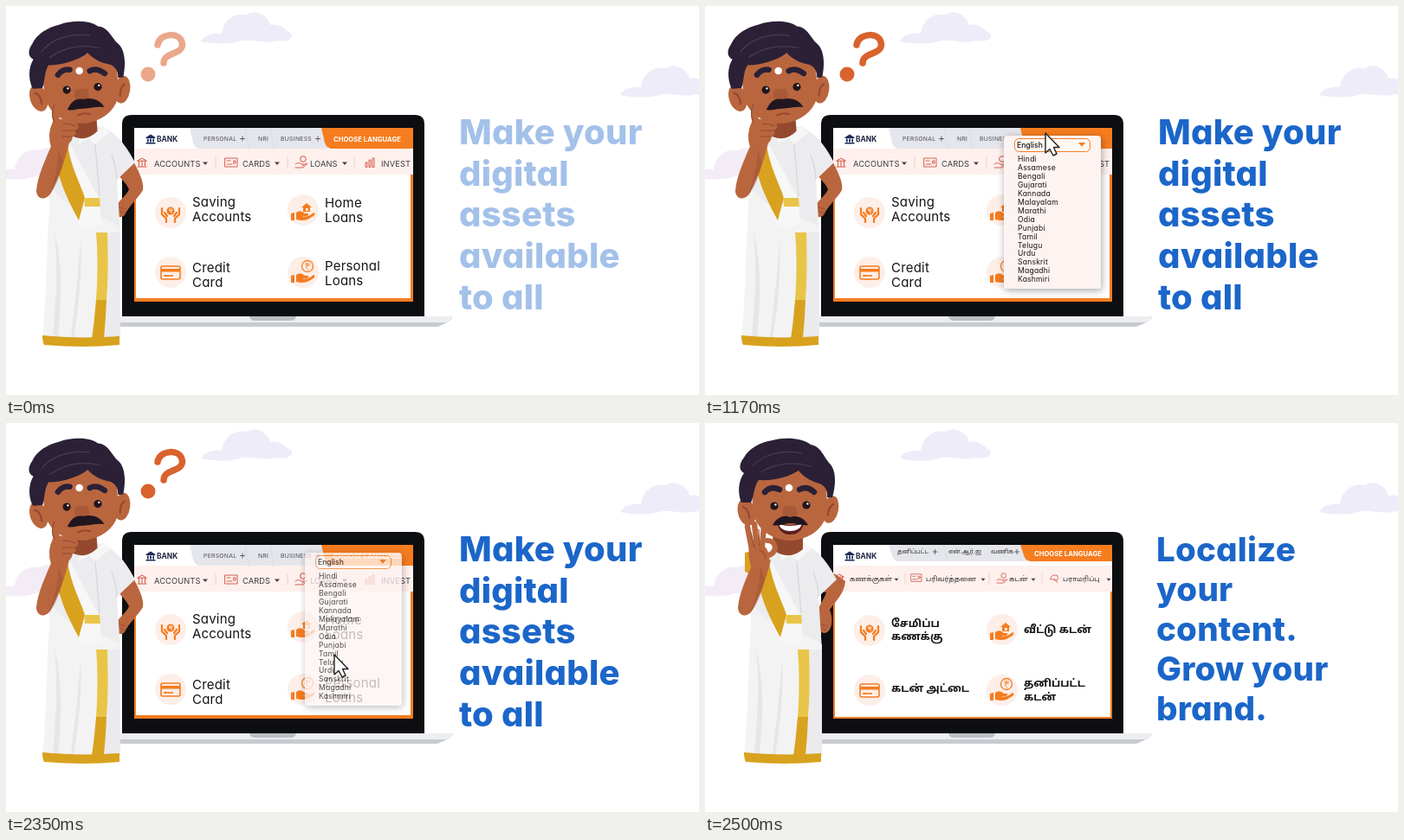
These frames come from a looping animation (800x450 px, 5.1 s). An HTML page:

```html
<!DOCTYPE html>
<html lang="en">
<head>
<meta charset="utf-8">
<title>Choose language</title>
<style>
html, body { margin: 0; width: 100%; height: 100%; overflow: hidden; background: #fff; }
svg { display: block; width: 100vw; height: 100vh; }
text { font-family: Inter, "Open Sans", sans-serif; font-feature-settings: "cv11"; fill: #141414; white-space: pre; }
.head text { font-weight: 800; fill: #1b66c9; letter-spacing: .2px; }
.tamil text { font-family: "Noto Sans Tamil", "Noto Sans", sans-serif; }
.tamil text.latin { font-family: Inter, sans-serif; }
</style>
</head>
<body>
<svg id="stage" viewBox="0 0 800 450" xmlns="http://www.w3.org/2000/svg"></svg>
<script>
const ORANGE = '#f57c1f', GOLD = '#d8a21e', LIGHT_GOLD = '#e8c548', SKIN = '#b9663f', SKIN_DARK = '#94492e',
      HAIR = '#2b2036', RED = '#d4503f', PINK = '#fdf0ed', GRAY = '#e5e6eb';

const path = (d, fill, extra = '') => `<path d="${d}" fill="${fill}" ${extra}/>`;
const line = (d, color, width, extra = '') =>
  `<path d="${d}" fill="none" stroke="${color}" stroke-width="${width}" stroke-linecap="round" stroke-linejoin="round" ${extra}/>`;
const dot = (x, y, r, fill) => `<circle cx="${x}" cy="${y}" r="${r}" fill="${fill}"/>`;
const rect = (x, y, w, h, fill, extra = '') =>
  `<rect x="${x}" y="${y}" width="${w}" height="${h}" fill="${fill}" ${extra}/>`;
const text = (x, y, size, str, extra = '') => `<text x="${x}" y="${y}" font-size="${size}" ${extra}>${str}</text>`;
const lines = (x, y, size, step, list, extra = '') =>
  list.map((str, i) => text(x, y + i * step, size, str, extra)).join('');
const at = (x, y, content, scale = 1) => `<g transform="translate(${x} ${y}) scale(${scale})">${content}</g>`;
const group = (id, content, extra = '') => `<g id="${id}" ${extra}>${content}</g>`;

const arrowDown = (x, y, color = '#444', s = 3) => path(`M${x - s} ${y - s / 2}h${2 * s}l${-s} ${s * 1.2}z`, color);
const plus = (x, y) => line(`M${x - 2.5} ${y}h5M${x} ${y - 2.5}v5`, '#444', 0.8);

function clouds() {
  const cloud = 'M0 34C4 26 14 24 24 25C26 8 40 0 53 3C62 -4 78 4 80 15C92 12 97 21 105 25C106 32 98 35 88 33C74 37 62 32 48 33C36 38 12 37 0 34Z';
  return [[225, 7, '#eeecf8'], [709, 69, '#eeecf8'], [-14, 164, '#f3ecf6']]
    .map(([x, y, color]) => at(x, y, path(cloud, color))).join('');
}

function laptop() {
  return path('M134 360V137Q134 126 145 126H472Q483 126 483 137V360Z', '#0d0e11') +
    rect(148, 141, 322, 200, '#fff') +
    path('M100 359H516Q516 364 498 371H112Z', '#c8cbd0') +
    path('M100 359H516Q515 363 508 366H104Z', '#eceef1') +
    path('M281 359H335Q334 364 329 364H287Q282 364 281 359Z', '#bcc0c5');
}

// Small icons, each drawn around its own centre
const coin = (x, y, r = 6) =>
  `<circle cx="${x}" cy="${y}" r="${r}" fill="none" stroke="${ORANGE}" stroke-width="1.3"/>` +
  line(`M${x - 2} ${y - 3}h4.5m-4.5 2h4.5M${x - 2} ${y - 3}q5 1 1 4h-1l3 3`, ORANGE, 0.9);
const palm = path('M-14 4L-10 3V12H-14ZM-8 3Q-3 -1 2 4H6Q7 6 4 7H-1Q5 9 12 3Q15 4 12 7L5 11Q-1 13 -8 11Z', ORANGE);
const icons = {
  hands: dot(0, -2, 4.5, ORANGE) + line('M-1.5 -4h3.5m-3.5 1.6h3.5m-2.5 0l2 3', '#fff', 0.8) +
    line('M-10 -5V2L-5 7V11M-7 0L-4 4M10 -5V2L5 7V11M7 0L4 4', ORANGE, 2.2),
  house: palm + path('M-2 -3L4 -8L10 -3H8V2H0V-3Z', ORANGE) + rect(3, -2, 2.6, 3, '#fff'),
  card: `<rect x="-11" y="-7" width="22" height="15" rx="2" fill="none" stroke="${ORANGE}" stroke-width="1.6"/>` +
    rect(-11, -4, 22, 3.5, ORANGE) + line('M-7 4h3m2 0h1m2 0h1', ORANGE, 2),
  coin: palm + coin(5, -7, 6.5)
};
const tile = (x, y, icon) => dot(x, y, 18, '#fdeee8') + at(x, y, icons[icon]);

const navIcons = {
  bank: line('M-5 -2L0 -5L5 -2ZM-5 5H5M-3.5 -1V4M0 -1V4M3.5 -1V4', RED, 1),
  card: line('M-7 -5H7V5H-7ZM-5 -2H-1M-5 2H1M3 -2H5V1H3Z', RED, 0.9),
  loan: line('M-7 2Q-3 -1 0 2H3M-7 6H2L7 1Q5 1 1 4', RED, 0.9) + `<circle cx="2" cy="-4" r="3.3" fill="none" stroke="${RED}"/>`,
  chart: line('M-5 5V0H-3V5ZM-1 5V-3H1V5ZM3 5V-5H5V5Z', RED, 0.9),
  umbrella: line('M-5 0Q-3 -6 4 -4Q6 -1 4 2ZM0 0L4 5', RED, 0.9)
};

function bankMark() {
  return at(167, 154, path('M-5.5 -2L0 -5.5L5.5 -2V-1H-5.5ZM-5.5 4H5.5V5.5H-5.5ZM-4 -.5H-2.3V3.5H-4ZM-.9 -.5H.9V3.5H-.9ZM2.3 -.5H4V3.5H2.3Z', '#1c2c58')) +
    text(174, 157, 8.4, 'BANK', 'font-weight="700" style="fill:#1c2440" class="latin"');
}

function topBar(bottom, titleX, titleY) {
  return rect(148, 141, 322, 24, '#fff') +
    rect(148, 165, 322, 30, PINK) +
    path(`M212 141H372V${bottom}H224Q218 ${bottom} 216 ${bottom - 7}Z`, GRAY) +
    path(`M364 141H470V${bottom}H376Q370 ${bottom} 368 ${bottom - 7}Z`, ORANGE) +
    line(`M276 141L280 ${bottom}M305 141L309 ${bottom}`, '#dcdde3', 1) +
    bankMark() +
    text(titleX, titleY, 7.7, 'CHOOSE LANGUAGE', 'font-weight="700" style="fill:#fff" class="latin"');
}

const frame = (right, bottom) =>
  path(`M148 195H150V${bottom}H${right}V195H470V342H148Z`, ORANGE);
const separators = (xs, y) => xs.map(x => line(`M${x} ${y - 6}v12`, '#ecc9c4', 0.8)).join('');

function englishScreen() {
  const top = 'style="fill:#4b4b55" letter-spacing=".3"', nav = 'style="fill:#3c3c46" letter-spacing=".1"';
  return topBar(165, 378, 156.5) + frame(467, 338) +
    text(228, 156, 6.8, 'PERSONAL', top) + plus(273, 153.5) +
    text(291, 156, 6.8, 'NRI', top) + text(317, 156, 6.8, 'BUSINESS', top) + plus(360, 153.5) +
    at(157, 181, navIcons.bank) + text(171, 185.5, 9.3, 'ACCOUNTS', nav) + arrowDown(230, 182) +
    at(260, 181, navIcons.card) + text(273, 185.5, 9.3, 'CARDS', nav) + arrowDown(313, 182) +
    at(341, 181, navIcons.loan) + text(351, 185.5, 9.3, 'LOANS', nav) + arrowDown(391, 182) +
    at(420, 181, navIcons.chart) + text(433, 185.5, 9.3, 'INVEST', nav) +
    separators([242, 325, 402], 181) +
    tile(190, 239, 'hands') + lines(215, 232, 15, 17, ['Saving', 'Accounts'], 'letter-spacing=".2"') +
    tile(343, 236, 'house') + lines(368, 233, 15, 17, ['Home', 'Loans'], 'letter-spacing=".2"') +
    tile(190, 308, 'card') + lines(215, 308, 15, 17, ['Credit', 'Card'], 'letter-spacing=".2"') +
    tile(343, 308, 'coin') + lines(368, 306, 15, 17, ['Personal', 'Loans'], 'letter-spacing=".2"');
}

function tamilScreen() {
  const bold = 'font-weight="600"', nav = 'font-weight="500" style="fill:#333"';
  return topBar(160, 380, 153.8) + frame(468, 340) +
    text(222, 151.3, 6.9, 'தனிப்பட்ட', nav) + plus(265.5, 149) +
    text(281, 151.3, 6.9, 'என்.ஆர்.ஐ', nav) + text(330, 151.3, 6.9, 'வணிக', nav) + plus(360, 149) +
    at(155, 180, navIcons.bank) + text(167, 183, 7.9, 'கணக்குகள்', nav) + arrowDown(221, 181, '#444', 2.5) +
    at(244, 179, navIcons.card, 0.85) + text(255, 183, 7.9, 'பரிவர்த்தனை', nav) + arrowDown(321, 181, '#444', 2.5) +
    at(343, 180, navIcons.loan, 0.85) + text(351, 183, 7.9, 'கடன்', nav) + arrowDown(379, 181, '#444', 2.5) +
    at(403, 180, navIcons.umbrella, 0.9) + text(413, 183, 7.9, 'பராமரிப்பு', nav) + arrowDown(466, 181, '#444', 2.5) +
    separators([231, 328, 389], 180) +
    tile(190, 240, 'hands') + lines(215, 236, 12.4, 14.5, ['சேமிப்ப', 'கணக்கு'], bold) +
    tile(343, 239, 'house') + text(368, 243, 12.4, 'வீட்டு கடன்', bold) +
    tile(190, 309, 'card') + text(215, 311, 12.4, 'கடன் அட்டை', bold) +
    tile(343, 309, 'coin') + lines(368, 305, 12.4, 15.5, ['தனிப்பட்ட', 'கடன்'], bold);
}

function languageMenu() {
  const names = ['Hindi', 'Assamese', 'Bengali', 'Gujarati', 'Kannada', 'Malayalam', 'Marathi', 'Odia',
    'Punjabi', 'Tamil', 'Telugu', 'Urdu', 'Sanskrit', 'Magadhi', 'Kashmiri'];
  return rect(345, 150, 112, 177, '#fdf3f1', 'rx="4" filter="url(#shadow)"') +
    rect(357.5, 153.5, 87, 15, '#fff8f4', `rx="5" stroke="${ORANGE}"`) +
    text(360, 163.8, 8.6, 'English', 'font-weight="500"') + arrowDown(435, 160, ORANGE, 4) +
    lines(361, 180, 8.6, 9.95, names, 'letter-spacing=".2"');
}

function body(hipArm) {
  return path(hipArm, SKIN) +
    line('M129 236l8 4M128 232l10 3', SKIN_DARK, 0.8) +
    path('M66 150C80 138 108 134 122 146C134 155 142 168 149 181L128 201L132 262H52L50 215C54 190 58 165 66 150Z', '#ececee') +
    path('M84 139L97 151L112 138L120 146L103 160L96 153L84 160Z', '#f6f6f7') +
    line('M122 172Q128 188 128 201M103 160L108 220', '#d3d3d8', 1) +
    path('M52 210C80 245 110 240 132 256L131 386L42 384C48 330 46 270 52 210Z', '#f3f3f4') +
    path('M56 262C66 300 64 345 60 383H54C58 340 60 300 56 262ZM86 270C88 310 84 350 78 384H75C80 340 84 310 86 270Z', '#e6e6e9') +
    path('M117 262H132V384H113C117 345 119 300 117 262Z', '#ebebee') +
    path('M42 381C70 384 105 384 131 382V392Q90 396 44 392Q42 388 42 381Z', GOLD) +
    path('M104 262H117C118 290 118 315 116 340L104 340C106 312 106 285 104 262Z', LIGHT_GOLD) +
    path('M104 340H116Q115 368 112 393H98Q102 366 104 340Z', GOLD) +
    path('M60 164L75 162L108 224L110 252Q92 260 84 252Q60 205 60 164Z', '#f7f7f8') +
    path('M56 162L71 160C75 188 88 210 91 222L84 248C70 222 57 195 56 162Z', GOLD) +
    path('M90 222H108L109 232H91Z', LIGHT_GOLD) +
    path('M53 160C46 176 36 198 35 214C36 225 47 225 52 216C60 200 68 180 73 158Z', SKIN) +
    path('M60 164C62 180 56 200 50 218C57 212 63 196 66 180Z', SKIN_DARK, 'opacity=".35"');
}

// Head without expression
function headBase() {
  return path('M78 126L79 147Q97 160 113 146V124Z', SKIN_DARK) +
    `<ellipse cx="48" cy="103" rx="10" ry="16" fill="${SKIN}" transform="rotate(-14 48 103)"/>` +
    `<ellipse cx="145" cy="100" rx="9" ry="16" fill="${SKIN}" transform="rotate(12 145 100)"/>` +
    line('M44 97Q51 100 51 110M148 94Q142 98 142 107', SKIN_DARK, 2.2) +
    path('M54 66C70 50 124 50 140 68L141 100C140 120 122 135 98 136C74 135 57 120 55 100Z', SKIN) +
    path('M42 92C37 80 39 66 45 58C38 54 40 46 45 40C50 30 64 22 78 20C92 16 112 17 122 25C134 27 136 38 144 47C152 55 151 73 147 86H141C142 78 138 72 132 70C120 67 112 60 108 55C96 63 78 67 62 66C56 74 57 84 53 92Z', HAIR) +
    line('M55 50C66 37 88 30 112 35M64 57C80 47 100 44 122 50', '#493a55', 1.2) +
    dot(97, 75, 4.3, '#fff') +
    path('M91 96Q87 108 94 110H103Q109 106 104 96Z', SKIN_DARK, 'opacity=".45"');
}

const eye = (x, y) => dot(x, y, 4.6, '#21151a') + dot(x + 1.4, y - 1.6, 1.2, '#fff');

function thinkingMan() {
  const face = headBase() + eye(81, 96) + eye(117, 95) +
    line('M72 78Q78 71 86 73M109 76Q117 72 126 80', HAIR, 6.5) +
    path('M80 119C86 108 92 106 99 108C111 106 119 111 123 119C114 117 106 119 99 119C91 118 86 121 80 119Z', '#21161f') +
    line('M92 126Q99 123 106 126', SKIN_DARK, 2);
  const hand = line('M59 117Q54 126 62 142', SKIN, 8) +
    path('M54 134C62 128 72 130 82 136Q86 141 79 144Q83 148 77 151Q76 160 66 161L52 163Q47 148 54 134Z', SKIN) +
    line('M66 136Q74 136 80 139M65 144H78M65 151H76M56 114Q51 124 56 134', SKIN_DARK, 1.1);
  const hipArm = 'M146 178C153 190 160 205 158 213C152 223 142 231 137 242C131 247 125 243 125 236C128 226 140 219 142 212C139 205 133 200 130 196Z';
  return body(hipArm) + `<g transform="translate(-12 0) rotate(-4 97 80)">${face}</g>` + hand;
}

function happyMan() {
  const face = headBase() + eye(80, 96) + eye(117, 95) +
    line('M69 80Q76 72 86 77M109 77Q118 72 126 80', HAIR, 6.5) +
    path('M83 115Q98 121 114 115Q112 129 98 129Q86 129 83 115Z', '#5a2020') +
    path('M85 117Q98 121 112 117Q109 125 98 125Q88 125 85 117Z', '#fff') +
    path('M78 118C84 108 92 106 98 109C106 106 114 109 119 118C112 119 104 116 98 116C92 116 84 120 78 118Z', '#21161f');
  const hand = line('M54 146L49 120M60 143L57 117M66 142L68 120', SKIN, 6.5) +
    line('M66 154Q80 154 81 144Q80 136 72 136', SKIN, 6) +
    path('M51 142Q62 136 71 145Q77 156 72 166L54 168Q49 156 51 142Z', SKIN) +
    line('M53 127L57 144M62 123L63 142M63 147Q69 150 70 156', SKIN_DARK, 1.1);
  const hipArm = 'M146 174L159 183C158 197 148 206 141 216C145 226 144 238 138 242C130 246 126 236 127 224C126 212 135 204 137 196L129 194Z';
  const shoulderCloth = path('M46 150L56 148V176L46 172Z', GOLD);
  return shoulderCloth + at(3, 0, body(hipArm)) + face + hand;
}

const questionMark = line('M175 45C177 31 202 29 203.5 44C204 57 182 53 182 66', '#d9622d', 7.5) + dot(164, 79, 8.5, '#d9622d');

const stage = document.getElementById('stage');
stage.innerHTML =
  `<defs>
    <filter id="shadow" x="-20%" y="-20%" width="140%" height="140%"><feDropShadow dx="1" dy="2" stdDeviation="4" flood-opacity=".35"/></filter>
    <clipPath id="screen"><rect x="148" y="141" width="322" height="201"/></clipPath>
  </defs>` +
  clouds() + laptop() +
  group('english',
    `<g clip-path="url(#screen)">${englishScreen()}${group('menu', languageMenu())}</g>` + thinkingMan() +
    group('question', questionMark) +
    group('ask', lines(523, 160, 40, 47.7, ['Make your', 'digital', 'assets', 'available', 'to all']), 'class="head"')) +
  group('tamil',
    `<g clip-path="url(#screen)" class="tamil">${tamilScreen()}</g>` + happyMan() +
    group('answer', lines(521, 159.5, 38.5, 46, ['Localize', 'your', 'content.', 'Grow your', 'brand.']), 'class="head"')) +
  group('cursor', path('M0 0V23L5 18.5L9 26L13 24L9.5 16.5H16Z', '#fff', 'stroke="#222" stroke-width="1.4" stroke-linejoin="round"'));

const LOOP = 5100, STEP = 30, OPEN = 990, PICK = 1840, CLOSE = 2350, SWITCH = 2440;
const part = id => document.getElementById(id);
const clamp = v => Math.max(0, Math.min(1, v));
const fade = (id, v) => part(id).setAttribute('opacity', clamp(v));
const show = (id, on) => part(id).setAttribute('display', on ? 'inline' : 'none');
const easeOut = p => 1 - (1 - clamp(p)) ** 1.5;
const mix = (a, b, p) => a + (b - a) * p;
// Every movement advances in steps counted from its own start
const since = (t, start) => Math.floor((t - start) / STEP) * STEP;

function cursorPosition(t) {
  const enter = easeOut(since(t, OPEN) / 180), leave = easeOut(since(t, PICK) / 180);
  return t < PICK
    ? [mix(376, 393, enter), mix(488, 147, enter)]
    : [mix(393, 379, leave), mix(147, 268, leave)];
}

function render(now) {
  const t = Math.round(now) % LOOP;
  show('english', t < SWITCH);
  show('tamil', t >= SWITCH);
  fade('ask', 0.4 + since(t, 0) / 100);
  fade('question', 0.55 + since(t, 0) / 130);
  fade('menu', t < OPEN ? 0 : t < CLOSE ? 1 : 0.75 - since(t, CLOSE) / 90);
  fade('answer', 0.25 + since(t, SWITCH) / 80);
  fade('cursor', t < OPEN ? 0 : t < SWITCH ? 1 : 0.45 - since(t, SWITCH) / 133);
  part('cursor').setAttribute('transform', `translate(${cursorPosition(t)})`);
}

const start = performance.now();
function tick() {
  render(performance.now() - start);
  requestAnimationFrame(tick);
}
tick();
</script>
</body>
</html>
```
